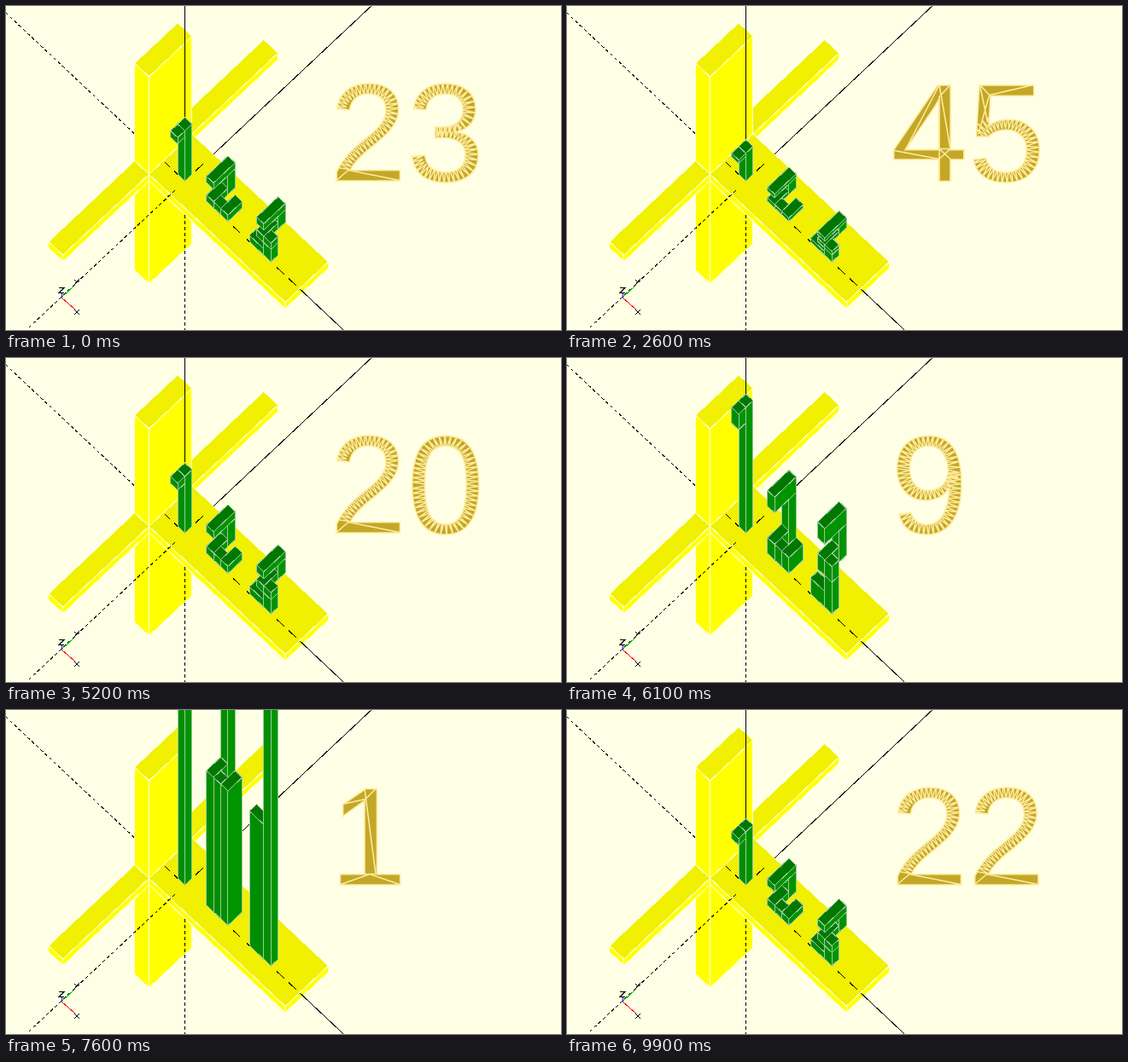
An HTML page for the animation above (10000 ms loop, 650 by 380 pixels).

```html
<!DOCTYPE html>
<html lang="en">
<head>
<meta charset="utf-8">
<title>Stretched digits</title>
<style>
  html, body { margin: 0; width: 100%; height: 100%; overflow: hidden; background: #ffffe5; }
  svg { display: block; }
  text { font: 163px "Liberation Sans", Arial, sans-serif; }
  .solid { shape-rendering: crispEdges; stroke-width: 1; stroke-linejoin: round; }
  .axes { shape-rendering: crispEdges; fill: none; stroke: #000; }
  .dash { stroke-dasharray: 4 3; }
</style>
</head>
<body>
<svg width="650" height="380" viewBox="0 0 650 380">
  <defs><clipPath id="glyphs"><text id="clipText" y="204.5"></text></clipPath></defs>
  <g id="beams" class="solid" stroke="#ffffdc"></g>
  <g class="axes">
    <path id="solidAxes"/>
    <path id="dashedAxes" class="dash"/>
    <path d="M185.5 182.8L192 189M197 193.6L203 199.2M222 193.5L231 185M266 258.4L274 266M282 273.5L288 279.1M317 306.4L326 314.9M331 319.6L340 328"/>
  </g>
  <g class="axes">
    <path stroke="#f00" d="M65 342L81 356"/>
    <path stroke="#0c0" d="M65 342L81 327"/>
    <path stroke="#00f" d="M65.5 342V337"/>
    <path d="M80 356L86 362M86 356L80 362M80 321L83 324M86 320L80 327M62 330.5H68L62 336.5H68"/>
  </g>
  <g id="digits" class="solid" stroke="#9cc89c"></g>
  <text id="label" y="204.5" fill="#c3a728" stroke="#ffeb9c" stroke-width="1.6"></text>
  <g clip-path="url(#glyphs)"><path id="mesh" fill="none" stroke="#ffeb9c" stroke-width="1.55"/></g>
</svg>
<script>
const $ = id => document.getElementById(id);
const CELL_X = 8.4, CELL_Y = 7.9, ORIGIN = [209.5, 205.3];
const TEXT_X = 379, ADVANCE = 90.6;

const project = (x, y, z) =>
  [ORIGIN[0] + CELL_X * (x + y), ORIGIN[1] + CELL_Y * (x - y) - z].map(v => v.toFixed(1)).join();

const line = (from, to) => `M${project(...from)}L${project(...to)}`;

const face = (fill, ...points) => `<polygon fill="${fill}" points="${points.join(' ')}"/>`;

// A box shows three faces: top, the one towards -y and the one towards +x.
function box([x, y, z, dx, dy, dz], unit, [top, left, right]) {
  const X = x + dx, Y = y + dy, lo = z * unit, hi = (z + dz) * unit;
  return face(left, project(x, y, lo), project(X, y, lo), project(X, y, hi), project(x, y, hi)) +
    face(right, project(X, y, lo), project(X, Y, lo), project(X, Y, hi), project(X, y, hi)) +
    face(top, project(x, y, hi), project(X, y, hi), project(X, Y, hi), project(x, Y, hi));
}

const YELLOW = ['#f0f000', '#ffff00', '#ffff00'];
const GREEN = ['#007800', '#008e00', '#009400'];

// Boxes as x, y, z and their sizes, ordered back to front.
const beams = [
  [-5, 4, -7.5, 2, 12, 7.5],
  [-5, -2, -128.5, 2, 6, 243],
  [-3, -2, -7.5, 19, 6, 7.5],
  [-5, -14, -7.5, 2, 12, 7.5],
];
const solids = [
  [-1, 0, 0, 1, 1, 8], [-1, -1, 7, 1, 1, 1],
  [3, 2, 0, 1, 1, 4], [3, 0, 0, 1, 2, 1], [3, 0, 3, 1, 3, 1],
  [4, 0, 0, 1, 1, 1], [5, 0, 0, 1, 2, 1],
  [9, 0, 0, 2, 1, 1], [10, 2, 2, 1, 1, 3], [10, 0, 2, 1, 2, 1], [10, 0, 4, 1, 3, 1],
  [11, 0, 0, 1, 1, 2], [11, 0, 2, 1, 1, 1],
];

const ring = (cx, cy, rx, ry) => `M${cx - rx} ${cy}a${rx} ${ry} 0 1 1 ${2 * rx} 0a${rx} ${ry} 0 1 1 ${-2 * rx} 0`;

// Per digit: centre lines of the curved strokes, then seams of the straight parts.
const strokes = [
  [[ring(45, -56, 31, 51)], ''],
  [[], 'M13 0L47 -12L82 0M41 -12H54M41 -112L54 -12M15 -94L42 -100L54 -112'],
  [['M10 -84C14 -116 74 -120 75 -83C75 -56 22 -44 14 -13'], 'M8 0L22 -12L82 0'],
  [['M10 -83C14 -115 72 -117 72 -84C72 -66 56 -60 32 -60', 'M32 -60C56 -60 77 -52 76 -30C74 4 12 6 8 -30'], ''],
  [[], 'M4 -35L57 -25M18 -37H84M57 -25L70 -37M57 0V-37L70 -25V0M57 -112L70 -37M57 -37V-98L70 -112M18 -37L57 -112'],
  [['M13 -54C30 -80 76 -74 76 -36C76 6 16 6 10 -28'], 'M14 -112L25 -100L77 -112M25 -100L12 -54M14 -112L23 -68'],
  [['M74 -86C66 -118 16 -116 15 -52C15 -10 30 -6 45 -6C84 -6 84 -66 45 -66C28 -66 17 -54 16 -40'], ''],
  [['M72 -98C50 -70 36 -40 34 0'], 'M9 -100L81 -112M66 -100L81 -112M66 -100L81 -101'],
  [[ring(45, -84, 28, 24), ring(45, -31, 31, 26)], ''],
  [['M74 -70C76 -20 64 -4 42 -5C26 -5 18 -12 14 -24', ring(43, -75, 29, 33)], ''],
];

// Zigzag across a centre line, like a triangulated ribbon.
function zigzag(d) {
  const path = document.createElementNS('http://www.w3.org/2000/svg', 'path');
  path.setAttribute('d', d);
  const length = path.getTotalLength(), points = [];
  for (let s = 0, side = 9; s < length; s += 2.6, side = -side) {
    const a = path.getPointAtLength(Math.max(0, s - .5));
    const b = path.getPointAtLength(Math.min(length, s + .5));
    const angle = Math.atan2(b.y - a.y, b.x - a.x);
    const x = (a.x + b.x) / 2 - side * Math.sin(angle);
    const y = (a.y + b.y) / 2 + side * Math.cos(angle);
    points.push(`${x.toFixed(1)} ${y.toFixed(1)}`);
  }
  return 'M' + points.join('L');
}

const meshes = strokes.map(([curves, seams]) => curves.map(zigzag).join('') + seams);

function shift(d, dx, dy) {
  let x = 0, y = 0;
  return d.replace(/([MLHV])([^MLHV]+)/g, (_, command, args) => {
    const [a, b] = args.trim().split(/\s+/).map(Number);
    if (command === 'H') x = a;
    else if (command === 'V') y = a;
    else [x, y] = [a, b];
    return `${command === 'M' ? 'M' : 'L'}${(x + dx).toFixed(1)} ${(y + dy).toFixed(1)}`;
  });
}

function draw(step) {
  const angle = 23 + 22 * Math.sin(step / 100 * 2 * Math.PI);
  const unit = 2.875 / Math.sin(angle * Math.PI / 180);
  $('digits').innerHTML = solids.map(s => box(s, unit, GREEN)).join('');

  const number = String(Math.round(angle));
  const xs = [...number].map((_, i) => TEXT_X + i * ADVANCE);
  for (const id of ['label', 'clipText']) {
    $(id).textContent = number;
    $(id).setAttribute('x', xs.join(' '));
  }
  $('mesh').setAttribute('d', [...number].map((c, i) => shift(meshes[c], xs[i], 204.5)).join(''));
}

$('beams').innerHTML = beams.map(b => box(b, 1, YELLOW)).join('');
$('solidAxes').setAttribute('d',
  line([16, 0, 0], [30, 0, 0]) + line([0, 4, 0], [0, 30, 0]) + line([0, 0, 0], [0, 0, 210]));
$('dashedAxes').setAttribute('d',
  line([-25, 0, 0], [-7, 0, 0]) + line([0, -1.4, 0], [0, -30, 0]) + line([0, 0, -40], [0, 0, -180]));

const start = performance.now();
let shown = -1;
function tick() {
  const step = Math.floor((performance.now() - start) / 100) % 100;
  if (step !== shown) draw(shown = step);
  requestAnimationFrame(tick);
}
tick();
</script>
</body>
</html>
```
